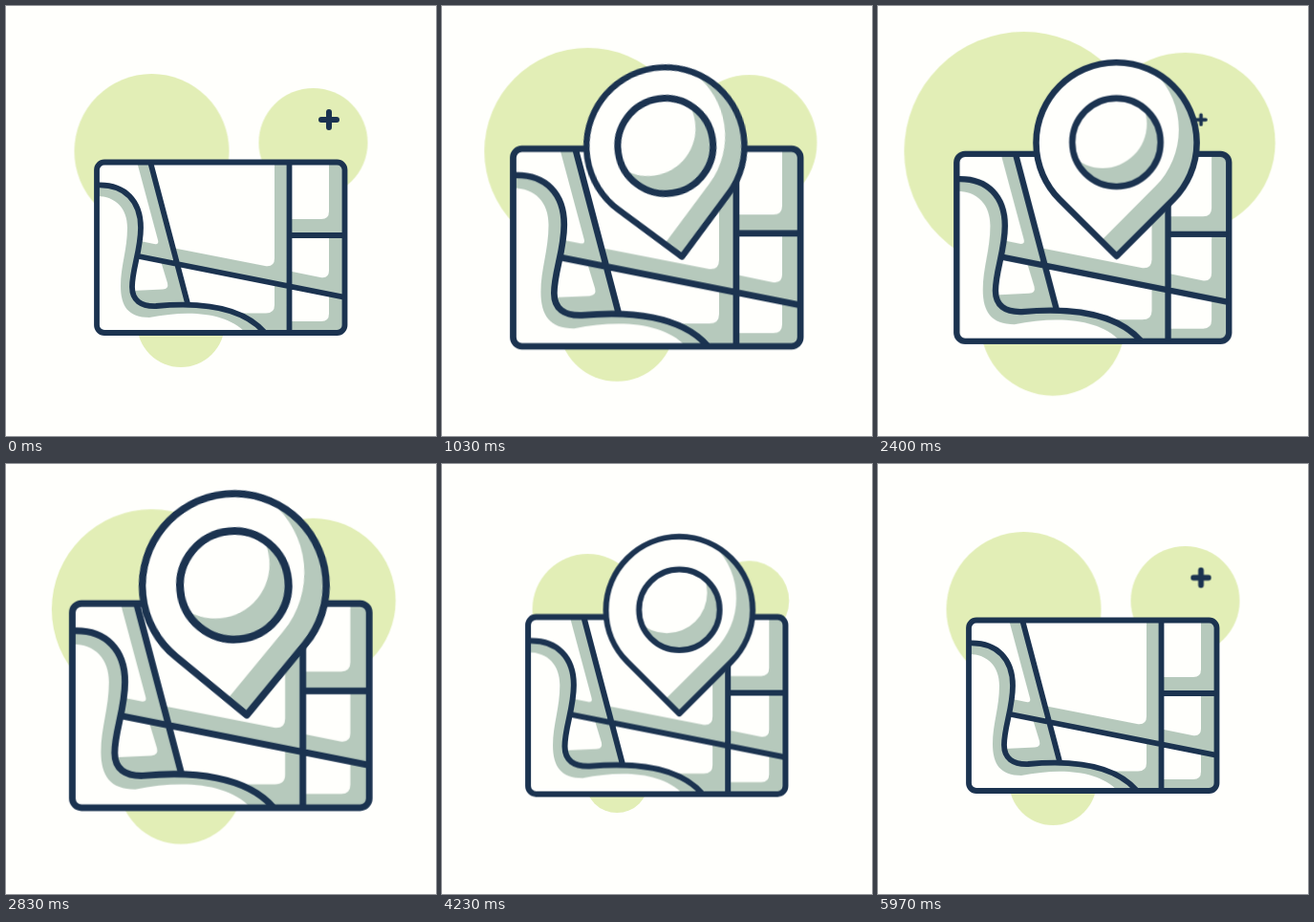
Animation of 450 by 450 pixels, one loop 6010 ms. Source, as an HTML page without scripts:

```html
<!DOCTYPE html>
<html lang="en">
<head>
<meta charset="utf-8">
<title>Map pin</title>
<style>
  :root { --paper: #fffffc; --ink: #1b3350; --shade: #b6c9bc; --lime: #e2eeb6; }
  html, body { margin: 0; width: 100%; height: 100%; overflow: hidden; background: var(--paper); }
  svg { display: block; width: 100vw; height: 100vh; }

  .blob { fill: var(--lime); }
  .paper { fill: var(--paper); }
  .shade { fill: var(--shade); }
  .line { fill: none; stroke: var(--ink); stroke-width: 5.8; stroke-linejoin: round; }
  .plus { fill: none; stroke: var(--ink); stroke-width: 6; stroke-linecap: round; }

  .anim { animation: 6.01s cubic-bezier(.333, 0, .667, 1) infinite; transform-origin: 0 0; }
  .big { animation-name: big; }
  .mid { animation-name: mid; }
  .small { animation-name: small; }
  .plus-right { animation-name: plus-right; }
  .plus-left { animation-name: plus-left; }
  .map { animation-name: pulse; animation-duration: 2.00333s; }
  .tilt { animation-name: tilt; }
  .pin { animation-name: pin; }
  .hole { animation-name: hole; }

  @keyframes big {
    0%, 100% { transform: scale(1); }
    33.3% { transform: scale(1.642); }
    66.6% { transform: scale(.704); }
  }
  @keyframes mid {
    0%, 1.7%, 100% { transform: scale(1); }
    39.1% { transform: scale(1.655); }
    71.5% { transform: scale(.728); }
  }
  @keyframes small {
    0%, 100% { transform: scale(1); }
    35.8% { transform: scale(1.69); }
    69% { transform: scale(.717); }
  }
  @keyframes plus-right {
    0%, 37%, 100% { transform: scale(1); }
    7%, 29%, 44%, 93% { transform: scale(0); }
  }
  @keyframes plus-left {
    0%, 24.5%, 36.5%, 87%, 99.7%, 100% { transform: scale(0); }
    30.5%, 93% { transform: scale(1); }
  }
  @keyframes pulse {
    0%, 80%, 100% { transform: scale(1); }
    40% { transform: scale(1.198); }
  }
  @keyframes tilt {
    0%, 3.3%, 39.1%, 69.9%, 100% { transform: rotate(0deg); }
    20%, 53.2% { transform: rotate(-9.2deg); }
    87.4% { transform: rotate(1.5deg); }
  }
  @keyframes pin {
    0%, 3.3%, 87.4%, 100% { transform: scale(0); }
    12.65%, 45.9%, 79.2% { transform: scale(1.122); }
    16.6%, 49.9% { transform: scale(.965); }
    23.3%, 36.6%, 56.6%, 69.9% { transform: scale(1); }
  }
  @keyframes hole {
    0%, 8.3%, 83.2%, 100% { transform: scale(0); }
    16.6%, 49.9% { transform: scale(1.1); }
    23.3%, 41.6%, 56.6%, 74% { transform: scale(1); }
  }
</style>
</head>
<body>
<svg viewBox="0 0 450 450">
  <defs>
    <path id="drop" d="M0 0L-52.2 -52.1A73.9 73.9 0 1 1 52.2 -52.1Z"/>
    <circle id="disc" r="40.6"/>
    <rect id="sheet" x="95" y="163.500" width="259.500" height="178.500" rx="8"/>
    <path id="cross" d="M-8 0H8M0 -8V8"/>
    <clipPath id="in-drop"><use href="#drop"/></clipPath>
    <clipPath id="in-disc"><use href="#disc"/></clipPath>
    <clipPath id="in-sheet"><use href="#sheet"/></clipPath>
  </defs>

  <g class="blob">
    <g transform="translate(152.5 152)"><circle class="anim big" r="81"/></g>
    <g transform="translate(321.5 143)"><circle class="anim mid" r="57"/></g>
    <g transform="translate(183 332)"><circle class="anim small" r="46"/></g>
  </g>

  <g class="plus">
    <g transform="translate(338 119)"><use class="anim plus-right" href="#cross"/></g>
    <g transform="translate(115 135)"><use class="anim plus-left" href="#cross"/></g>
  </g>

  <g transform="translate(224.8 252.7)">
    <g class="anim map">
      <g transform="translate(-224.8 -252.7)">
        <g clip-path="url(#in-sheet)">
          <use class="shade" href="#sheet"/>
          <!-- lit part of each block -->
          <g class="paper">
            <path d="M95 199C115 199 127 212 127 232C127 255 120 272 120 293C120 314 128 326 150 326C190 318 230 320 251 342H95Z"/>
            <path d="M95 163H137L159 245Q160.500 250 155 249L140.500 246C143 205 125 186 95 187.500Z"/>
            <path d="M151 163H281V264Q281 273.500 271 272L174 253Z"/>
            <path d="M138 262L162 267L169 290Q170.500 296 164 296.500L132 298C132 285 136 275 138 262Z"/>
            <path d="M179 270L281 290.400V313Q281 321.500 272 321.500H242C225 314 205 312 190 313Z"/>
            <path d="M297 163H338V215q0 8 -8 8H297Z"/>
            <path d="M297 240H338V277Q338 285.500 329 284L297 277.500Z"/>
            <path d="M297 294L338 302V322q0 8 -8 8H297Z"/>
          </g>
          <g class="line">
            <path d="M95 187.500C125 186 141 205 141 232C141 256 132 275 132 294C132 308 141 314.500 157 314C200 310 247 314 271 342"/>
            <path d="M151 163L190.500 313M139 262L355 305M296.500 163V342M297 240H355"/>
          </g>
        </g>
        <use class="line" href="#sheet"/>

        <g transform="translate(247.5 261)">
          <g class="anim tilt">
            <g class="anim pin">
              <g clip-path="url(#in-drop)">
                <use class="shade" href="#drop"/>
                <use class="paper" href="#drop" x="-16.5" y="-12"/>
              </g>
              <use class="line" href="#drop"/>
              <g transform="translate(0 -104.7)">
                <g class="anim hole">
                  <g clip-path="url(#in-disc)">
                    <use class="shade" href="#disc"/>
                    <use class="paper" href="#disc" x="-12.6" y="-17"/>
                  </g>
                  <use class="line" href="#disc"/>
                </g>
              </g>
            </g>
          </g>
        </g>
      </g>
    </g>
  </g>
</svg>
</body>
</html>
```
